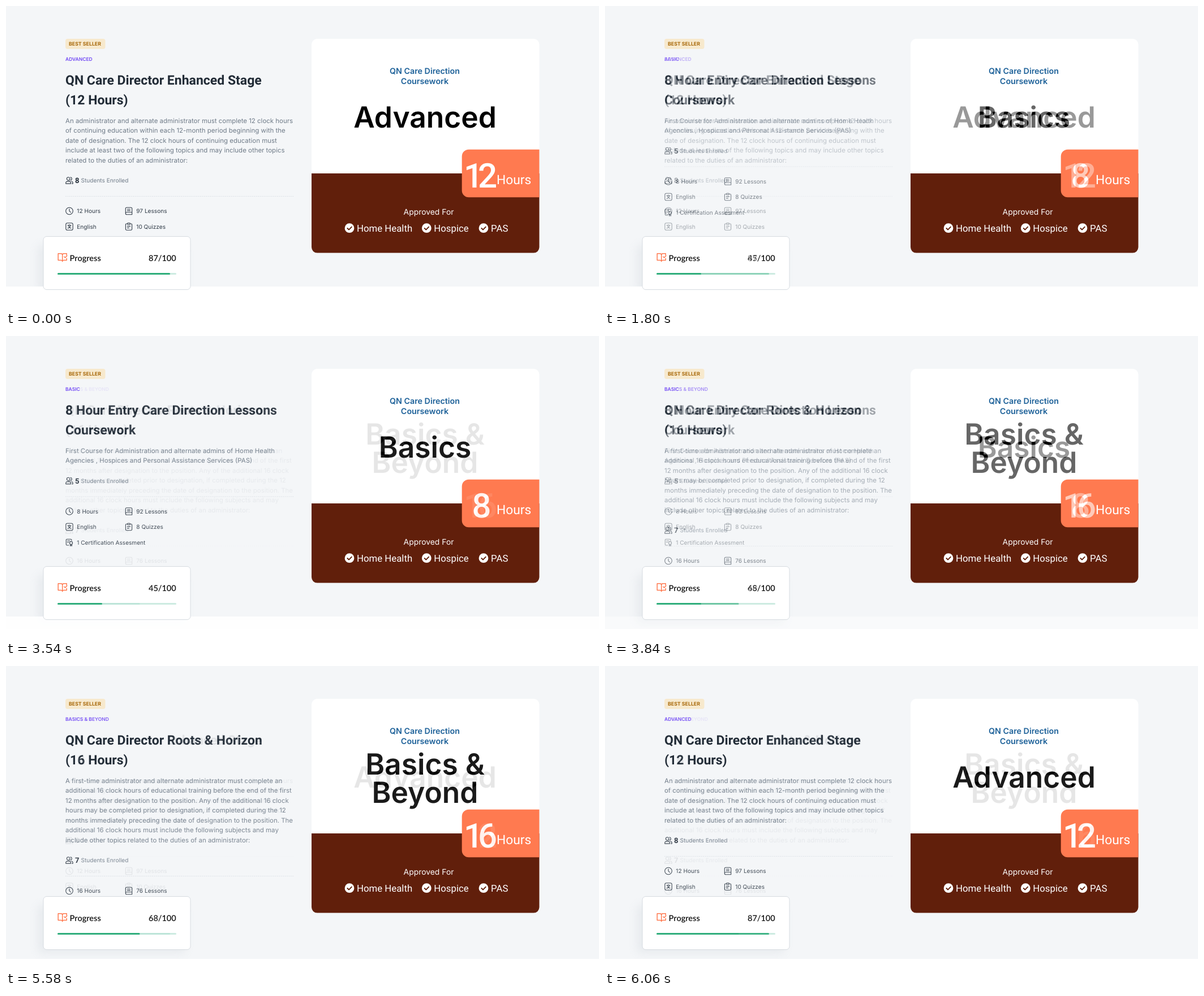
These frames come from a looping animation (1048 by 534 pixels, 6120 ms). An HTML page:

```html
<!DOCTYPE html>
<html lang="en">
<head>
<meta charset="utf-8">
<title>Course slider</title>
<style>
  html, body { margin: 0; width: 100%; height: 100%; overflow: hidden; background: #fff; }
  svg { display: block; width: 100%; height: 100%; }
  text { font-family: Inter, sans-serif; font-optical-sizing: none; text-rendering: geometricPrecision; white-space: pre; }
  .badge { font-size: 8.8px; font-weight: 700; fill: #a96a0b; }
  .level { font-size: 8.5px; font-weight: 600; fill: #7047f5; }
  .title { font: 700 23px Roboto, sans-serif; fill: #212b36; }
  .copy { font-size: 11.46px; fill: #6f7b88; }
  .small { font-size: 10.1px; fill: #6f7b88; }
  .count { font: 700 13px Roboto, sans-serif; fill: #212b36; }
  .meta { font-size: 10.1px; fill: #2f3a46; }
  .brand { font-size: 14.3px; font-weight: 600; fill: #1d6199; text-anchor: middle; }
  .hero { font-size: 51.5px; font-weight: 600; fill: #000; text-anchor: middle; }
  .hours { font: 500 60px Roboto, sans-serif; letter-spacing: -9px; fill: #fff; }
  .unit { font: 400 22.8px Roboto, sans-serif; fill: #fff; }
  .approved { font-size: 13.9px; fill: #fff; text-anchor: middle; }
  .type { font: 400 16.8px Roboto, sans-serif; fill: #fff; }
  .progress { font: 600 14.5px Lato, sans-serif; fill: #111; }
  .end { text-anchor: end; }
  .icon { fill: none; stroke: #2f3a46; stroke-width: 1.1; stroke-linecap: round; stroke-linejoin: round; }
  #shadow { filter: blur(8px); }
  #scenes { isolation: isolate; }
  .scene { mix-blend-mode: plus-lighter; }
</style>
</head>
<body>
<svg id="stage" viewBox="0 0 1048 534" preserveAspectRatio="none"></svg>
<script>
const LOOP = 6120, STEP = 60, STEPS = 10;
const FADES = [1500, 3540, 5580];

const COURSES = [
  {
    level: 'ADVANCED',
    title: ['QN Care Director Enhanced Stage', '(12 Hours)'],
    copy: [
      'An administrator and alternate administrator must complete 12 clock hours',
      'of continuing education within each 12-month period beginning with the',
      'date of designation. The 12 clock hours of continuing education must',
      'include at least two of the following topics and may include other topics',
      'related to the duties of an administrator:'],
    students: 8, hours: 12, lessons: 97, quizzes: 10,
    hero: ['Advanced'], progress: 87, barEnd: 290
  },
  {
    level: 'BASIC',
    title: ['8 Hour Entry Care Direction Lessons', 'Coursework'],
    copy: [
      'First Course for Administration and alternate admins of Home Health',
      'Agencies , Hospices and Personal Assistance Services (PAS)'],
    students: 5, hours: 8, lessons: 92, quizzes: 8, certificate: true,
    hero: ['Basics'], progress: 45, barEnd: 170
  },
  {
    level: 'BASICS &amp; BEYOND',
    title: ['QN Care Director Roots &amp; Horizon', '(16 Hours)'],
    copy: [
      'A first-time administrator and alternate administrator must complete an',
      'additional 16 clock hours of educational training before the end of the first',
      '12 months after designation to the position. Any of the additional 16 clock',
      'hours may be completed prior to designation, if completed during the 12',
      'months immediately preceding the date of designation to the position. The',
      'additional 16 clock hours must include the following subjects and may',
      'include other topics related to the duties of an administrator:'],
    students: 7, hours: 16, lessons: 76,
    hero: ['Basics &amp;', 'Beyond'], progress: 68, barEnd: 236.5
  }
];

// Icon paths are centred on 0,0.
const ICONS = {
  people: 'M-4.6-3a2.8 2.8 0 1 0 5.6 0a2.8 2.8 0 1 0-5.6 0M-6.3 5.6v-1.2a2.8 2.8 0 0 1 2.8-2.8h3.2a2.8 2.8 0 0 1 2.8 2.8v1.2zM2-5.8a2.8 2.8 0 0 1 0 5.5M3.8 1.7a2.8 2.8 0 0 1 2.4 2.7v1.2h-1.6',
  clock: 'M-6.3 0a6.3 6.3 0 1 0 12.6 0a6.3 6.3 0 1 0-12.6 0M0-3.6v3.8l2.4 2.2',
  book: 'M-3.7-6.2h7.4a2 2 0 0 1 2 2v10.4h-9.4a2 2 0 0 1-2-2v-8.4a2 2 0 0 1 2-2M-5.7 4a2 2 0 0 1 2-1.8h9.4M-2.6-3.2h5M-2.6-.6h5',
  language: 'M-3.8-6.2h7.6a2.4 2.4 0 0 1 2.4 2.4v7.6a2.4 2.4 0 0 1-2.4 2.4h-7.6a2.4 2.4 0 0 1-2.4-2.4v-7.6a2.4 2.4 0 0 1 2.4-2.4M-3-2.2h6M0-3.4v1.2M2-2.2q-1 4-4.8 5.2M-1.8-1.6q1.2 3.4 4.6 4.6',
  quiz: 'M-2-5h-2a1.6 1.6 0 0 0-1.6 1.6v8a1.6 1.6 0 0 0 1.6 1.6h8a1.6 1.6 0 0 0 1.6-1.6v-8a1.6 1.6 0 0 0-1.6-1.6h-2M-2-6.2h4v2.4h-4zM-2.6-.6h5.2M-2.6 2.4h3',
  certificate: 'M-1 5h-3.2a1.5 1.5 0 0 1-1.5-1.5v-7.8a1.5 1.5 0 0 1 1.5-1.5h6.6a1.5 1.5 0 0 1 1.5 1.5v1M-3.4-3h4.2M-3.4-.4h2M.4 1a2.6 2.6 0 1 0 5.2 0a2.6 2.6 0 1 0-5.2 0M1.6 3.4v2.8l1.4-.9 1.4.9v-2.8'
};

const text = (cls, x, y, s) => `<text class="${cls}" x="${x}" y="${y}">${s}</text>`;
const rect = (x, y, w, h, fill, r = 0, extra = '') =>
  `<rect x="${x}" y="${y}" width="${w}" height="${h}" rx="${r}" fill="${fill}" ${extra}/>`;
const lines = (cls, x, y, gap, list) => list.map((s, i) => text(cls, x, y + gap * i, s)).join('');
const icon = (name, x, y) => `<path class="icon" transform="translate(${x} ${y})" d="${ICONS[name]}"/>`;
const detail = (name, x, y, s) => icon(name, x, y) + text('meta', x + 13.3, y + 3.6, s);
const approval = (x, label) =>
  `<circle cx="${x}" cy="392.7" r="8.4" fill="#fff"/>
   <path d="M${x - 3.6} 393l2.6 2.6 4.8-5" fill="none" stroke="#611f0b" stroke-width="1.9" stroke-linecap="round" stroke-linejoin="round"/>` +
  text('type', x + 13, 399, label);

function backdrop() {
  return rect(0, 0, 1048, 518, '#f4f6f8') +
    rect(56, 422, 262, 86, '#919eab', 8, 'id="shadow" opacity=".12"') +
    rect(0, 518, 1048, 16, '#fff') +
    rect(0, 496, 1048, 22, '#fff', 0, 'id="floor"') +
    rect(105, 58, 70.5, 18, '#f7e9cd', 4) + text('badge', 111, 70, 'BEST SELLER') +
    '<path d="M540 297V68a10 10 0 0 1 10-10H932.5a10 10 0 0 1 10 10V297z" fill="#fff"/>' +
    '<path d="M540 296H942.5V426.6a10 10 0 0 1-10 10H550a10 10 0 0 1-10-10z" fill="#611f0b"/>' +
    '<path d="M942.5 253.7H817.7a12 12 0 0 0-12 12v60.6a12 12 0 0 0 12 12h124.8z" fill="#ff7a50"/>' +
    lines('brand', 740, 120, 17.5, ['QN Care Direction', 'Coursework']) +
    text('unit', 867, 315, 'Hours') +
    text('approved', 747, 368.7, 'Approved For') +
    approval(607, 'Home Health') + approval(743.3, 'Hospice') + approval(844, 'PAS') +
    rect(66, 407.5, 260, 94, '#fff', 6, 'stroke="#d6dbe0"') +
    `<path d="M99.7 450.5v-10.2q0-2.6-2.8-2.6h-4.7v11.8h4.9q2 0 2.6 2 .6-2 2.6-2h4.9v-3.2M99.7 440.3q0-2.6 2.8-2.6h4.7v2.6M102.8 443.2l1.8 1.8 3.2-3.4"
      fill="none" stroke="#ff7a50" stroke-width="1.5" stroke-linecap="round" stroke-linejoin="round"/>` +
    text('progress', 112.6, 450.5, 'Progress') +
    rect(91, 472, 210, 3, '#cdebe1', 1.5);
}

function scene(c) {
  const y = 221 + 17.5 * c.copy.length;
  const heroY = c.hero.length > 1 ? 192 : 215;
  return '<g class="scene">' +
    text('level', 105, 97, c.level) +
    lines('title', 105, 139, 35, c.title) +
    lines('copy', 105, 206.6, 17.5, c.copy) +
    icon('people', 112, y) + text('count', 122, y + 4.8, c.students) +
    text('small', 132.6, y + 3.6, 'Students Enrolled') +
    `<path d="M105 ${y + 28}H509" stroke="#dce1e6" stroke-dasharray="2 1.4"/>` +
    detail('clock', 112, y + 54, c.hours + ' Hours') +
    detail('book', 217, y + 54, c.lessons + ' Lessons') +
    (c.quizzes ? detail('language', 112, y + 81.5, 'English') + detail('quiz', 217, y + 81.5, c.quizzes + ' Quizzes') : '') +
    (c.certificate ? detail('certificate', 112, y + 109, '1 Certification Assesment') : '') +
    lines('hero', 740.5, heroY, 49.5, c.hero) +
    text('hours', c.hours > 9 ? 809 : 823.5, 320.5, c.hours) +
    text('progress end', 300.7, 450.5, c.progress + '/100') +
    rect(91, 472, c.barEnd - 91, 3, '#2fae7b', 1.5) + '</g>';
}

const stage = document.getElementById('stage');
stage.innerHTML = backdrop() + `<g id="scenes">${COURSES.map(scene).join('')}</g>`;

// Each fade is [index, rising]; opacity moves in equal hard steps.
function play(element, initial, fades) {
  const frames = [{ offset: 0, opacity: initial, easing: 'step-end' }];
  for (const [index, rising] of fades) {
    for (let k = 0; k < STEPS; k++) {
      const mix = (k + 1) / STEPS;
      frames.push({
        offset: (FADES[index] + k * STEP) / LOOP,
        opacity: rising ? mix : 1 - mix,
        easing: 'step-end'
      });
    }
  }
  if (frames[frames.length - 1].offset < 1) {
    frames.push({ offset: 1, opacity: frames[frames.length - 1].opacity });
  }
  element.animate(frames, { duration: LOOP, iterations: Infinity });
}

const [advanced, basic, beyond] = document.querySelectorAll('.scene');
play(advanced, 1, [[0, false], [2, true]]);
play(basic, 0, [[0, true], [1, false]]);
play(beyond, 0, [[1, true], [2, false]]);
play(document.getElementById('floor'), 1, [[1, false]]);
</script>
</body>
</html>
```
